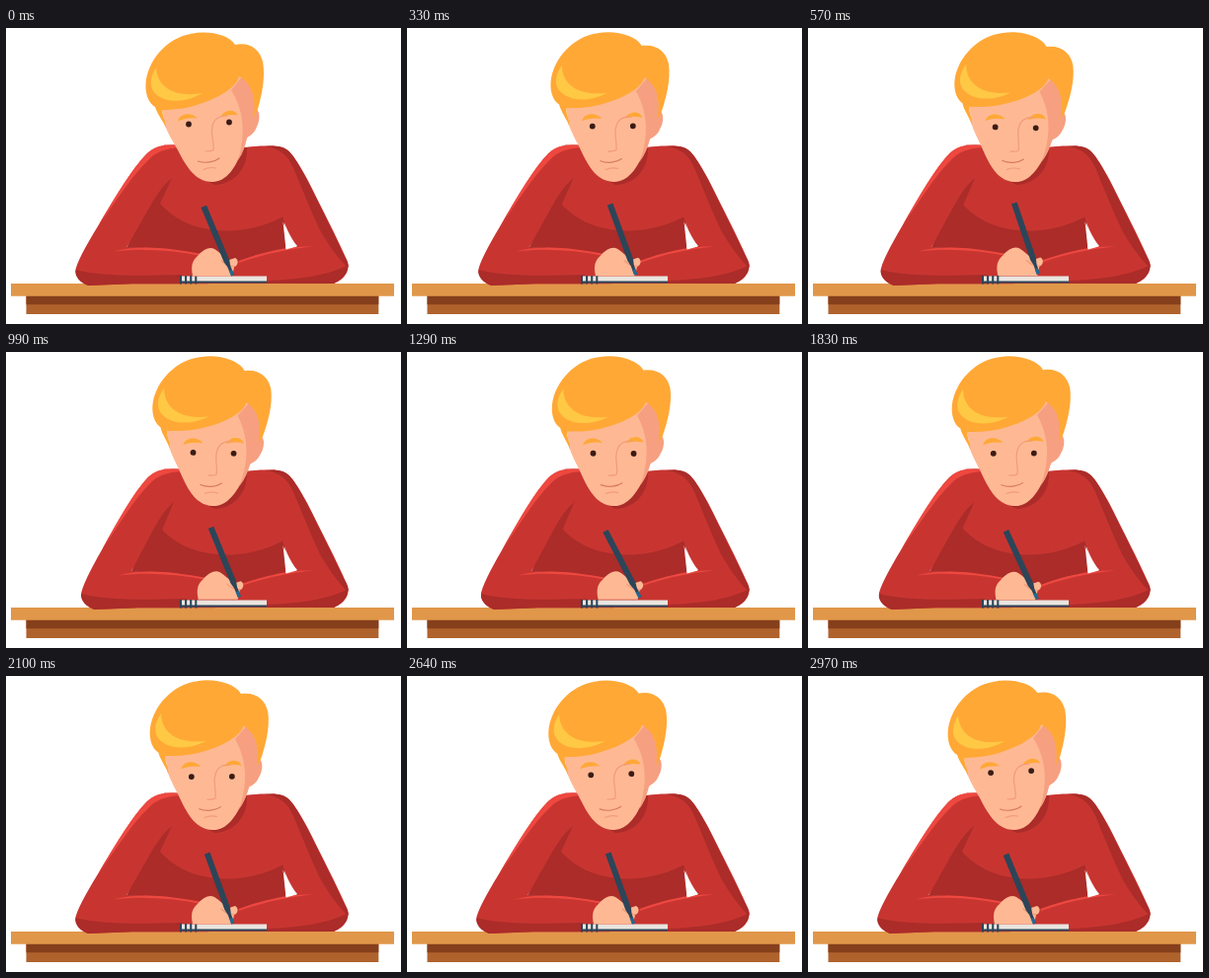
An HTML page that plays this animation: 400x300 px, repeating every 3 s.

```html
<!DOCTYPE html>
<html lang="en">
<head>
<meta charset="utf-8">
<title>Writing at a desk</title>
<style>
  html, body { margin: 0; width: 100%; height: 100%; overflow: hidden; background: #fff; }
  svg { display: block; width: 100%; height: 100%; }
  .red { fill: #c83531; }
  .dark { fill: #ab2c29; }
  .glow { fill: #ee4840; }
  .skin { fill: #feb994; }
  .shade { fill: #f6a081; }
  .hair { fill: #ffa836; }
  .navy { fill: #2c4559; }
  .line { fill: none; stroke: #f29a7b; stroke-width: 1.2; stroke-linecap: round; }
  .mouth { stroke: #d97a62; }
</style>
</head>
<body>
<svg viewBox="0 0 400 300">
  <!-- torso -->
  <path class="dark" d="M158 160L128 240H250L283.500 227L280 150Z"/>
  <path class="red" d="M160 118.500L243 121L270 119.500C282 120 287 125 293 135L281 191C262 201 243 205.500 222 205.500C193 205 171 195 155 177L168 150Z"/>

  <!-- right arm -->
  <path class="red" d="M242 121C256 119 277 118 284 123.500C291 128 299 142 305 153C319 181 335 212 345 235C348 242 346 249 339 255L330 260H200V236H235C258 228 279 224 295 221C288 213 281 198 279 186L277 162Z"/>
  <path class="dark" d="M262 120C280 118 285 122 291 130C302 147 308 160 345 235C347 239 347 241 346 243C335 232 326 219 318 205C308 184 300 163 291 142C285 129 278 122 262 120Z"/>
  <path class="dark" d="M264 256C290 255 325 252 346.500 240C347 249 340 256 330 260H264Z"/>
  <path class="glow" d="M236 236C260 227 285 221 311 221.500C287 223.500 261 229 236 238Z"/>
  <path fill="#fff" d="M280.500 196C284 207 288 215 294.500 221.500L283.500 224.500Z"/>

  <!-- desk -->
  <path fill="#b0622d" d="M20.500 271H377.300V290H20.500Z"/>
  <path fill="#853f1b" d="M20.500 271H377.300V280.300H20.500Z"/>
  <path fill="#e0974a" d="M5 259H393V271.700H5Z"/>

  <!-- left arm -->
  <g id="arm">
    <path class="red" d="M178 119C161 117.500 151 120 143 127C129 141 113 168 97 194C85 214 74 232 70.500 244C69 252 76 258 83 261L128 259.300H205V231C180 225 150 222 122 222L153 180C157 171 162 160 168 152Z"/>
    <path class="dark" d="M168 152C157 161 151 172 145 182L122 222.500L140 223L156 178Z"/>
    <path class="dark" d="M70.500 245C95 252 135 251 178 250V259.300H128L83 261C75 258 69 252 70.500 245Z"/>
    <path class="glow" d="M178 119C159 117 150 120 143 127C127 143 112 169 94 199C111 176 128 149 145 133C152 126 160 122 178 121Z"/>
    <path class="glow" d="M109 226.500C132 219 168 223 198 229V231C168 225 136 223 109 226.500Z"/>
  </g>

  <!-- notebook -->
  <path fill="#e9e5df" d="M176 251.500H264V257H176Z"/>
  <path class="navy" d="M176 256.500H264V258.500H176Z"/>
  <path stroke="#2c4559" stroke-width="8.500" stroke-dasharray="2 3.100" d="M176 255.200H194"/>

  <!-- hand and pen -->
  <g id="hand">
    <path class="skin" d="M189 251.500C187 242 188 236 194 231C200 224 206 221.500 211 224C216 227 220 232 226 235L232 233C236 235 235 241 231 242L229 251.500Z"/>
    <path class="line" d="M231 241.500C226 242 222 240 218 236"/>
  </g>
  <g id="pen">
    <path class="navy" d="M-3 -76H3V-16L1.600 -10V0H-1.600V-10L-3 -16Z"/>
    <path fill="#246a92" d="M-1.600 -6H1.600V0H-1.600Z"/>
  </g>

  <!-- head -->
  <path class="dark" d="M244 121C245 142 232 158 211 159L196 151L225 121Z"/>
  <g id="head">
    <path class="skin" d="M156 70L161 99C164 107 169 115 173 122C181 137 190 156 209 156C223 156 233 142 240 121L245 110L252 50L225 45Z"/>
    <path class="shade" d="M228 63L240 48L254 52L253 82C258 84 257 95 254 100C252 106 248 109 244 111C243 118 240 127 235 134C243 107 241 84 228 63Z"/>
    <path class="hair" d="M162 101C159 94 153 87 151 80C144 76 141 66 141.500 57C143 33 163 10 187 6C205 2 226 7 232 17C247 14 257 22 260 34C263 50 259 68 255 82L251 90C253 75 251 57 236 49C233 61 214 71 199 76C186 81 172 83 158.500 83C158 90 162 94 162 101Z"/>
    <path fill="#ffc845" d="M152 40C153 59 169 71 199 66C184 75 164 77 153 68C144 61 146 49 152 40Z"/>
    <g id="brows" class="hair">
      <path d="M174 94.500C175 87 187 84 194 91.500C187 90.500 180 91.500 174 94.500Z"/>
      <path d="M217 90.500C221 82 232 81.500 235 88.500C229 87.500 223 88 217 90.500Z"/>
    </g>
    <g id="eyes" fill="#3a1c16">
      <circle cx="185" cy="97.500" r="2.900"/>
      <circle cx="226" cy="95.500" r="2.900"/>
    </g>
    <g id="face">
      <path class="line" d="M224 89C214 89 209 94 208.500 103C208 110 211 118 210 123.500C208 125 205 125 202 125"/>
      <path class="line mouth" d="M194.500 135C202 137.500 211 136 216 132"/>
      <path class="line" d="M200 143.500C204 141.500 208 141 212.500 142"/>
    </g>
  </g>
</svg>
<script>
  const LOOP = 3000, STEP = 30;

  const clamp = v => Math.min(1, Math.max(0, v));
  const ramp = (t, from, to) => clamp((t - from) / (to - from));
  const bump = (t, peak, width) => clamp(1 - Math.abs(t - peak) / width);
  const move = (id, value) => document.getElementById(id).setAttribute('transform', value);

  function drawArm(t) {
    // out across the page and back, leaning from a fixed shoulder
    const shift = 6 * bump(t, 1040, 1060);
    const lean = shift / 140;
    move('arm', `matrix(1 0 ${lean} 1 ${-105 * lean} 0)`);
    move('hand', `translate(${shift} ${-shift * .15})`);

    const stroke = bump(t, 1480, 700);
    const seam = bump(t, 0, 500) + bump(t, LOOP, 500);
    const angle = -18.7 - 12 * stroke - 4 * seam;
    const x = 229.5 + 1.1 * shift + 2 * stroke;
    move('pen', `translate(${x} ${251 - shift * .5}) rotate(${angle})`);
  }

  function drawHead(t) {
    // turn upright, then settle back in two stages
    const turn = ramp(t, 0, 560) - .38 * ramp(t, 1000, 1500) - .62 * ramp(t, 2160, LOOP);
    const drop = 6.5 * Math.sin(Math.PI * t / LOOP) ** .7;
    move('head', `rotate(${4 * turn} 208 156)`);
    move('eyes', `translate(${.8 * turn} ${drop})`);
    move('brows', `translate(${1.3 * turn} ${1.8 * turn})`);
    move('face', `translate(${.8 * turn} ${.4 * turn})`);
  }

  function tick(now) {
    const t = Math.floor((now % LOOP) / STEP) * STEP;
    drawArm(t);
    drawHead(t);
    requestAnimationFrame(tick);
  }
  tick(0);
</script>
</body>
</html>
```
